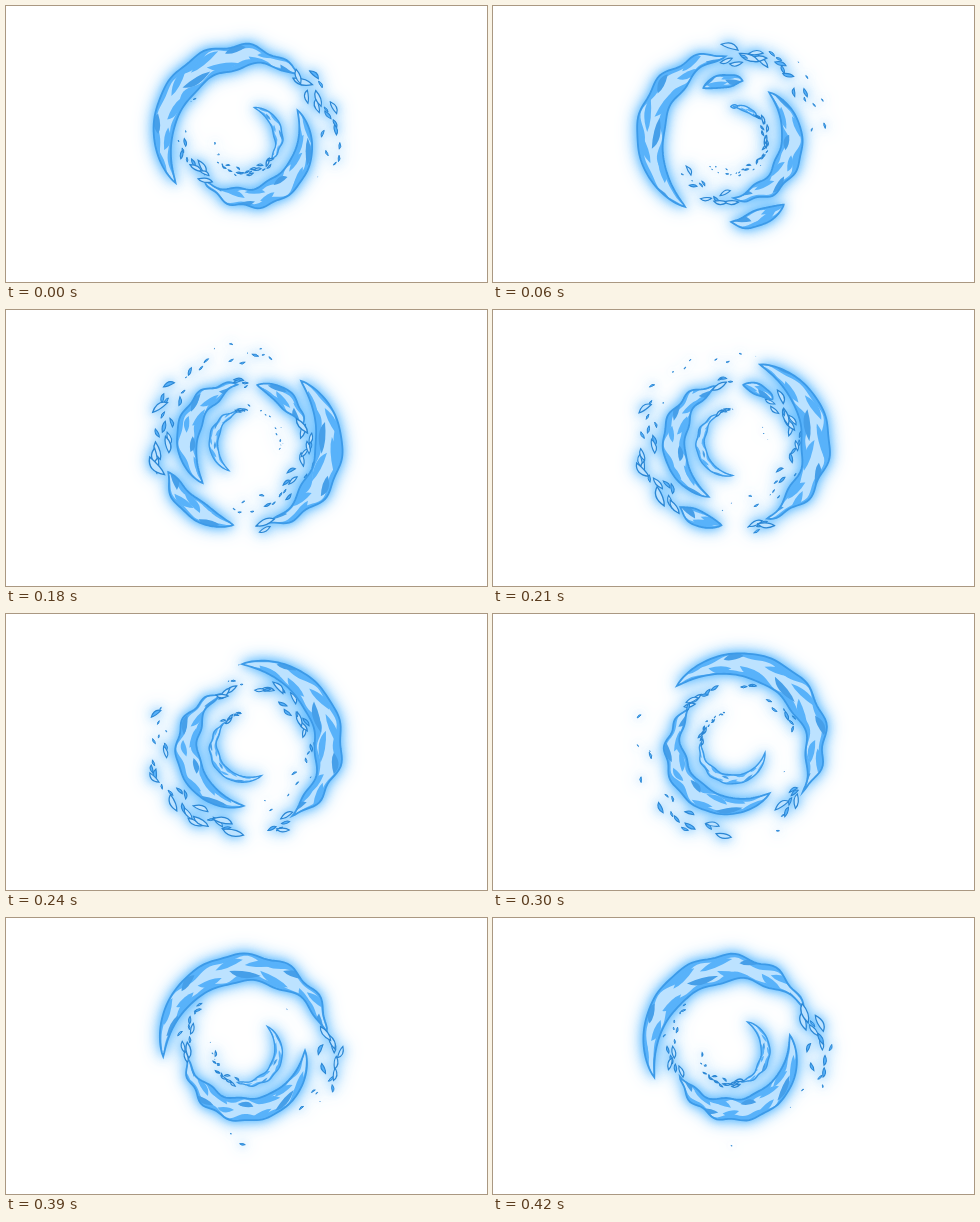
An HTML page with a canvas that plays this animation: 481x276 px, repeating every 0.45 s.

```html
<!DOCTYPE html>
<html lang="en">
<head>
<meta charset="utf-8">
<title>Water swirl</title>
<style>
  html, body { margin: 0; height: 100%; overflow: hidden; background: #fff; }
  canvas { display: block; filter: drop-shadow(0 0 4px #52b6ffc0) drop-shadow(0 0 8px #5cbaffe0); }
</style>
</head>
<body>
<canvas width="481" height="276"></canvas>
<script>
const ctx = document.querySelector('canvas').getContext('2d');
const LOOP = 450, STEP = 30, CX = 240, CY = 133;
const DARK = '#2a86d4', EDGE = '#3c9ae8', DEEP = '#469fe9', MID = '#58b2fa', LIGHT = '#bce2ff';

// Radius, half width, start angle (counter-clockwise degrees), birth and life in ms.
const rings = [
  { r: 59, w: 11, start: 80, sweep: 360, born: 30, life: 660, bits: 64, size: 10, seed: 20 },
  { r: 32.5, w: 4.4, start: 82, sweep: 365, born: 60, life: 480, bits: 64, size: 5, seed: 50 },
  { r: 83, w: 13.5, start: -92, sweep: 354, born: 30, life: 660, bits: 84, size: 12, seed: 90 }
];

const rand = n => { const v = Math.sin(n * 127.1) * 43758.5453; return v - Math.floor(v); };
const wave = (a, k, p) => Math.sin(a * k * Math.PI / 180 + p);

// The tip shoots out and slows down; the torn end starts slowly and catches up.
const headAt = (ring, p) => ring.start + 12 + (ring.sweep - 12) * (1 - Math.max(0, 1 - p / .94) ** 1.7);
const tailAt = (ring, p) => ring.start + ring.sweep * p ** 2;
const tornTime = (ring, share) => ring.born + ring.life * Math.sqrt(share);

function polar(a, r) {
  const t = a * Math.PI / 180;
  return [CX + r * Math.cos(t), CY - r * Math.sin(t)];
}

// Closed band between two angles; edge(u, a, side) gives the radius.
function band(from, to, edge) {
  const path = new Path2D(), n = 70;
  for (const side of [1, -1]) {
    for (let i = 0; i <= n; i++) {
      const u = side > 0 ? i / n : 1 - i / n, a = from + (to - from) * u;
      path.lineTo(...polar(a, edge(u, a, side)));
    }
  }
  path.closePath();
  return path;
}

// Curved drop, pointed at both ends.
function drop(a, r, length, width, tilt, bend) {
  const [x, y] = polar(a, r), t = -(a + 90 + tilt) * Math.PI / 180;
  const c = Math.cos(t), s = Math.sin(t), path = new Path2D();
  const at = (u, v) => [x + u * c - v * s, y + u * s + v * c];
  path.moveTo(...at(-length, -bend));
  path.quadraticCurveTo(...at(-length * .2, width + bend), ...at(length, -bend));
  path.quadraticCurveTo(...at(length * .3, -width + bend), ...at(-length, -bend));
  path.closePath();
  return path;
}

function paint(path, fill, line, color = DARK) {
  ctx.fillStyle = fill;
  ctx.fill(path);
  if (!line) return;
  ctx.strokeStyle = color;
  ctx.lineWidth = line;
  ctx.stroke(path);
}

function drawStream(ring, age) {
  const p = (age - ring.born) / ring.life;
  if (p < 0 || p > 1) return;
  const { r, w, seed } = ring;
  const head = headAt(ring, p), tail = tailAt(ring, p), arc = head - tail;
  if (arc < 4) return;
  const full = w * Math.min(1, .3 + arc / 140), flow = p * 9;
  const half = (u, a, s) => full * Math.sin(Math.PI * u) ** .8
    * (1 + .6 * (1 - u) ** 3 * wave(a, 11 + s * 2, flow + s));
  const body = band(tail, head, (u, a, s) => r + s * half(u, a, s));

  paint(body, MID);
  ctx.save();
  ctx.clip(body);
  paint(band(tail, head, (u, a, s) =>
    r + s * half(u, a, s) * (.62 + .16 * wave(a, 7, s - flow) + .14 * wave(a, 13, s * 2 + flow))), LIGHT);
  const count = Math.ceil(arc / 13);
  for (let i = 0; i < count; i++) {
    const k = seed + i * 3, side = i % 2 ? 1 : -1;
    const a = tail + arc * (i + rand(k)) / count;
    paint(drop(a, r + side * full * (.3 + .35 * rand(k + 1)), w * (.7 + .7 * rand(k + 2)),
      w * .5, side * 10, side * w * .1), i % 3 ? MID : DEEP);
  }
  ctx.restore();
  ctx.strokeStyle = EDGE;
  ctx.lineWidth = Math.min(1.8, w * .3);
  ctx.stroke(body);
}

// Pieces torn off as the end of the stream passes them.
function drawBits({ r, w, start, sweep, bits, size, seed, ...ring }, age) {
  for (let i = 0; i < bits; i++) {
    const k = seed + i * 5, share = (i + rand(k)) / bits;
    const p = (age - tornTime(ring, share)) / (70 + 130 * rand(k + 1));
    if (p < 0 || p >= 1) continue;
    const scale = (1 - p) ** .8 * (.35 + .65 * rand(k + 2));
    const radius = r + (rand(k + 3) - .5) * w * 1.6 + p * w * .6;
    const shape = drop(start + sweep * share + p * 8, radius, size * scale, size * .6 * scale,
      (rand(k + 4) - .5) * 70, (rand(k + 3) - .5) * size * .4 * scale);
    paint(shape, scale > .5 ? LIGHT : MID, .8 + scale * .6);
  }
}

function frame() {
  const t = Math.floor(performance.now() % LOOP / STEP) * STEP;
  ctx.clearRect(0, 0, 481, 276);
  for (const age of [t + LOOP, t]) {
    for (const ring of rings) {
      drawStream(ring, age);
      drawBits(ring, age);
    }
  }
  requestAnimationFrame(frame);
}
frame();
</script>
</body>
</html>
```
